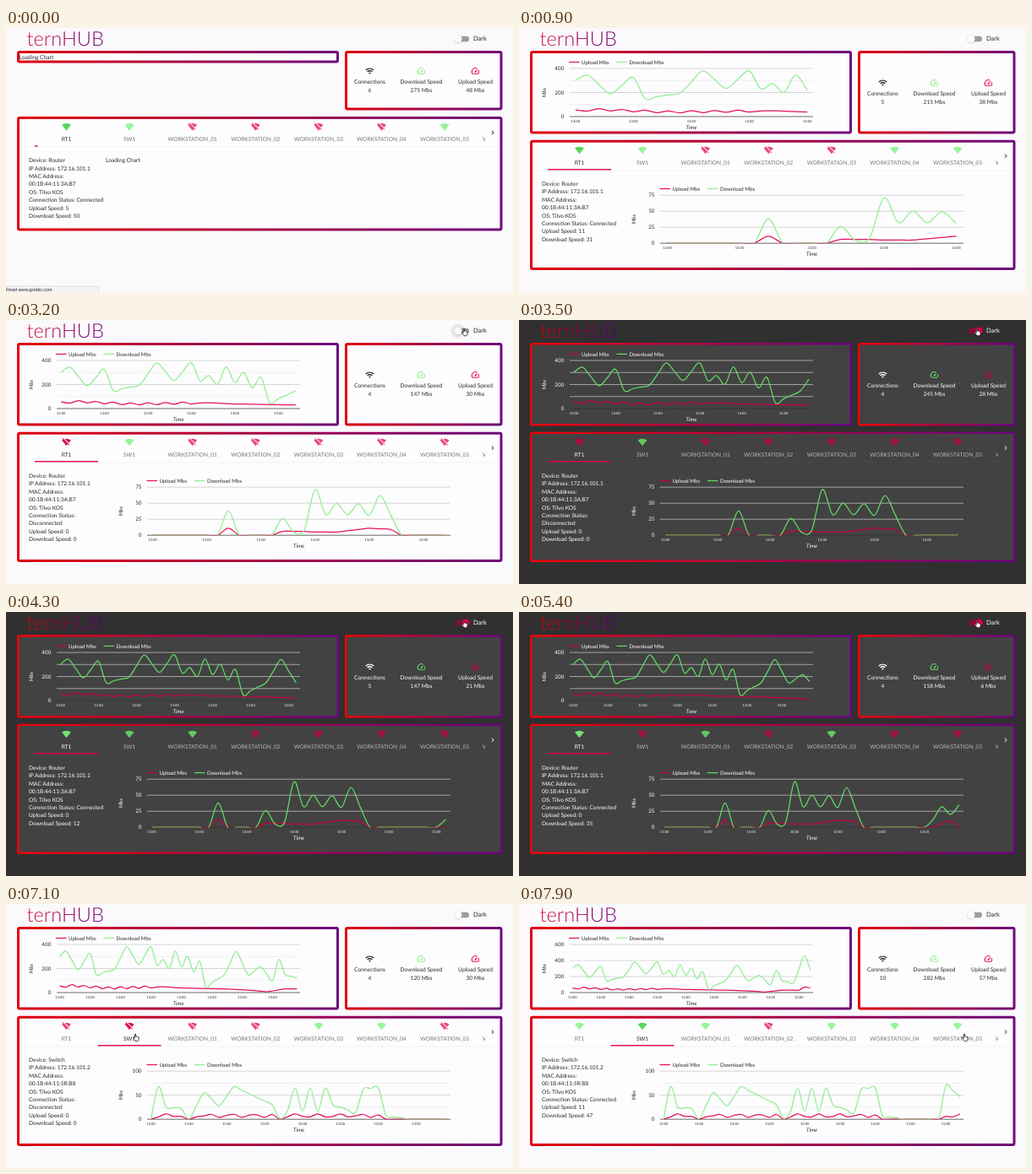
Write an HTML page that moves like this. It is 600 px wide and 313 px high and loops after 8000 ms.

```html
<!DOCTYPE html>
<html lang="en">
<head>
<meta charset="utf-8">
<title>Network dashboard</title>
<style>
  html, body { margin: 0; width: 100%; height: 100%; overflow: hidden; }
  svg { display: block; width: 600px; height: 313px; font-family: Lato, "Open Sans", sans-serif; text-rendering: geometricPrecision; }
</style>
</head>
<body>
<svg id="stage" viewBox="0 0 600 313"></svg>
<script>
const LOOP = 8000, STEP = 100;
const LOADED = 400, DARK_ON = 3400, DARK_OFF = 5800, TAB_SWITCH = 6600;
const POLL = 320, POLL_START = 750, SAMPLES = 44;

// Straight line between [position, value] keys, held at both ends
function track(keys, at) {
  const k = keys.findIndex(key => key[0] > at);
  if (k < 0) return keys[keys.length - 1][1];
  if (k === 0) return keys[0][1];
  const [[a, from], [b, to]] = [keys[k - 1], keys[k]];
  return from + (to - from) * (at - a) / (b - a);
}

// Samples along a track; within [first, last] odd ones swing up and even ones down
function series(keys, [first, last, size] = [0, -1, 0]) {
  return Array.from({ length: SAMPLES }, (_, i) => {
    const swing = i >= first && i <= last ? (i % 2 ? size : -size) : 0;
    return Math.round(track(keys, i) + swing);
  });
}

const total = {
  down: series([[0, 300], [1, 345], [3, 190], [5, 325], [6, 150], [9, 195], [11, 380], [13, 235], [15, 380],
    [16, 285], [17, 220], [19, 291], [23, 205], [24, 49], [27, 147], [29, 342], [31, 147], [33, 215], [35, 101],
    [36, 275], [37, 151], [39, 120], [41, 462], [42, 282]], [16, 23, 55]),
  up: series([[0, 48], [2, 58], [8, 38], [17, 48], [20, 38], [27, 30], [31, 21], [34, 6], [37, 30], [40, 30], [41, 68], [42, 57]], [0, 15, -8])
};
const router = {
  lines: ['Device: Router', 'IP Address: 172.16.101.1', 'MAC Address:', '00:1B:44:11:3A:B7'],
  down: series([[6, 0], [7, 38], [8, 0], [11, 0], [12, 26], [13, 5], [14, 8], [15, 71], [16, 41], [20, 40], [21, 62],
    [23, 0], [30, 0], [31, 12], [32, 32], [33, 20], [34, 35], [35, 0], [40, 0], [41, 40]], [16, 20, 9]),
  up: series([[6, 0], [7, 11], [8, 0], [11, 0], [12, 6], [17, 5], [20, 11], [22, 9], [23, 0], [31, 0], [33, 10], [34, 0]]),
  max: 75, step: 25
};
const netSwitch = {
  lines: ['Device: Switch', 'IP Address: 172.16.101.2', 'MAC Address:', '00:1B:44:11:5R:B8'],
  down: series([[0, 0], [1, 68], [2, 25], [4, 22], [5, 1], [7, 55], [9, 28], [11, 68], [16, 30], [17, 2], [18, 41], [23, 41],
    [24, 30], [27, 14], [28, 62], [30, 65], [31, 8], [34, 0], [39, 0], [40, 70], [42, 47]], [18, 23, 24]),
  max: 100, step: 50
};
netSwitch.up = netSwitch.down.map((v, i) => v > 8 ? Math.round(7.5 + 3.5 * Math.cos(2.2 * (i - 42))) : 0);

// Samples, connection count, workstation states
const links = [[18, 6, '00001'], [21, 5, '00011'], [28, 4, '00000'], [32, 5, '10000'],
  [35, 4, '10100'], [38, 4, '00110'], [43, 10, '10111']];

const POINTER_IN = 2700;
const pointerX = [[2700, 500], [3000, 542], [5900, 542], [6300, 153], [7300, 153], [7700, 527]];
const pointerY = [[2700, 90], [3000, 14], [5900, 14], [6300, 158]];

const light = {
  page: '#faf9fc', card: '#fdfcfe', ink: '#2b2b2b', dim: '#777', grid: '#ccc', minor: '#ececef', base: '#444',
  up: '#e3125c', down: '#90ee90', on: '#5bd65b', onDim: '#98f49a', off: '#d8144f', offDim: '#ec467f',
  left: '#e2000f', right: '#6f0a7a', title: ['#d3123a', '#74087c'], line: '#eeecf0', bar: '#e3125c', border: 3
};
const dark = {
  page: '#303030', card: '#424242', ink: '#fff', dim: '#b8b8b8', grid: '#bdbdbd', minor: '#bdbdbd', base: '#333',
  up: '#c2003f', down: '#62dc62', on: '#72e072', onDim: '#5fc95f', off: '#c2003f', offDim: '#b4083e',
  left: '#f00008', right: '#6c0082', title: ['#d4000c', '#50007a'], line: '#484848', bar: '#d80046', border: 2.4
};

const icons = {
  on: 'M12 21.5L23.64 7c-.45-.34-4.93-4-11.64-4S.81 6.66.36 7z',
  off: 'M23.64 7c-.45-.34-4.93-4-11.64-4-1.5 0-2.89.19-4.15.48L18.18 13.8zM17.04 15.22L3.27 1.44 2 2.72l2.05 2.06C1.91 5.76.59 6.82.36 7L12 21.5l3.91-4.87 3.32 3.32 1.27-1.27z',
  wifi: 'M1 9l2 2c4.97-4.97 13.03-4.97 18 0l2-2C16.93 2.93 7.08 2.93 1 9zm8 8l3 3 3-3c-1.65-1.66-4.34-1.66-6 0zm-4-4l2 2c2.76-2.76 7.24-2.76 10 0l2-2C15.14 9.14 8.87 9.14 5 13z',
  speed: 'M20.38 8.57l-1.23 1.85a8 8 0 0 1-.22 7.58H5.07A8 8 0 0 1 15.58 6.85l1.85-1.23A10 10 0 0 0 3.35 19a2 2 0 0 0 1.72 1h13.85a2 2 0 0 0 1.74-1 10 10 0 0 0-.27-10.44zm-9.79 6.84a2 2 0 0 0 2.83 0l5.66-8.49-8.49 5.66a2 2 0 0 0 0 2.83z',
  next: 'M8.59 16.59L13.17 12 8.59 7.41 10 6l6 6-6 6z',
  arrow: 'M0 0V15L3.6 11.6L6 17L8.4 16L6 10.8H11z',
  hand: 'M5 1.5c0-2 3-2 3 0V7c1-.8 2.6-.5 2.8.6 1-.6 2.4-.2 2.6.9 1.2-.4 2.4.2 2.4 1.6v4c0 3-2 5.4-5 5.4H9c-2 0-3-1-4-2.6L1 11.5c-1-1.6 1-3 2.3-1.6L5 11.6z'
};

const rect = (x, y, w, h, fill, extra = '') => `<rect x="${x}" y="${y}" width="${w}" height="${h}" fill="${fill}" ${extra}/>`;
const text = (x, y, s, size, fill, anchor = 'start', extra = '') =>
  `<text x="${x}" y="${y + size * 0.35}" font-size="${size}" fill="${fill}" text-anchor="${anchor}" ${extra}>${s}</text>`;
const icon = (name, cx, cy, fill, size = 11.3) =>
  `<path transform="translate(${cx - size / 2} ${cy - size / 2}) scale(${size / 24})" d="${icons[name]}" fill="${fill}"/>`;
const hLine = (x1, x2, y, color, w = 0.8) => `<path d="M${x1} ${y}H${x2}" stroke="${color}" stroke-width="${w}"/>`;

function card(x, y, w, h, c) {
  const b = c.border;
  return rect(x + b / 2, y + b / 2, w - b, h - b, c.card, `rx="1.5" stroke="url(#edge)" stroke-width="${b}"`);
}

function curve(values, count, px, py) {
  const at = i => {
    const k = Math.min(Math.max(i, 0), count - 1);
    return [px(k), py(values[k])];
  };
  let d = 'M' + at(0);
  for (let i = 0; i < count - 1; i++) {
    const [a, b, e, f] = [at(i - 1), at(i), at(i + 1), at(i + 2)];
    d += `C${b[0] + (e[0] - a[0]) / 6} ${b[1] + (e[1] - a[1]) / 6} ${e[0] - (f[0] - b[0]) / 6} ${e[1] - (f[1] - b[1]) / 6} ${e}`;
  }
  return d;
}

function chart(id, data, n, max, step, box, c) {
  const { x, top, w, legend, axisX, nameX } = box, h = 57, base = top + h;
  const px = i => x + (i + 0.5) * w / n, py = v => base - v / max * h;
  let s = `<clipPath id="${id}"><rect x="${x}" y="${top - 6}" width="${w}" height="${h + 6.4}"/></clipPath>`;
  if (max / step === 2) {
    for (const v of [0.5, 1.5]) s += hLine(x, x + w, py(v * step), c.minor);
  }
  for (let v = 0; v <= max; v += step) {
    s += hLine(x, x + w, py(v), v ? c.grid : c.base);
    s += text(axisX, py(v), v, 6.3, c.ink, 'end');
  }
  for (const key of ['up', 'down']) {
    s += `<path clip-path="url(#${id})" d="${curve(data[key], n, px, py)}" fill="none" stroke="${c[key]}" stroke-width="1.25"/>`;
  }
  for (let i = 0; i < n; i += 5) s += text(px(i), base + 5.2, '13:00', 4.1, c.ink, 'middle');
  ['up', 'down'].forEach((key, i) => {
    const lx = legend + i * 56.5, name = ['Upload Mbs', 'Download Mbs'][i];
    s += hLine(lx, lx + 12.5, top - 7.6, c[key], 1.2) + text(lx + 15, top - 7.6, name, 6.15, c.ink);
  });
  s += text(x + w / 2, base + 12.8, 'Time', 6.3, c.ink, 'middle', 'font-style="italic"');
  const ny = top + h / 2;
  return s + text(nameX, ny, 'Mbs', 6.3, c.ink, 'middle', `font-style="italic" transform="rotate(-90 ${nameX} ${ny})"`);
}

function toggle(isDark, hover, c) {
  const x = isDark ? 544 : 535;
  return (hover ? `<circle cx="${x}" cy="13" r="8.5" fill="${isDark ? c.up : '#000'}" opacity=".07"/>` : '')
    + rect(532, 9.8, 16, 6.4, isDark ? '#860c3a' : '#9b9b9d', 'rx="3.2"')
    + `<circle cx="${x}" cy="13.5" r="4.9" fill="#000" opacity=".18"/>`
    + `<circle cx="${x}" cy="13" r="4.6" fill="${isDark ? '#e00049' : '#fcfcfc'}"/>`
    + text(553, 12.7, 'Dark', 7.5, c.ink);
}

function stats(dy, n, conn, c) {
  const items = [
    [430.5, 'wifi', c.ink, 'Connections', conn],
    [491.5, 'speed', c.down, 'Download Speed', total.down[n - 1] + ' Mbs'],
    [555.5, 'speed', c.up, 'Upload Speed', total.up[n - 1] + ' Mbs']
  ];
  return items.map(([x, name, fill, label, value]) => icon(name, x, 65 + dy, fill)
    + text(x, 78 + dy, label, 6.7, c.ink, 'middle') + text(x, 88 + dy, value, 6.6, c.ink, 'middle')).join('');
}

function tabs(y, active, states, barWidth, c) {
  const gap = 74.6;
  let s = hLine(16, 584.5, y + 36.2, c.line, 0.7);
  states.forEach((isOn, i) => {
    const name = ['RT1', 'SW1'][i] || 'WORKSTATION_0' + (i - 1);
    const x = 71.5 + i * gap, kind = isOn ? 'on' : 'off', chosen = i === active;
    s += icon(kind, x, y + 12.2, c[chosen ? kind : kind + 'Dim']);
    s += text(x, y + 27, name, 6.6, chosen ? c.ink : c.dim, 'middle');
  });
  s += `<clipPath id="more"><rect x="560" y="${y}" width="7" height="36"/></clipPath>`;
  s += text(564, y + 27, 'WORKSTATION_06', 6.6, c.dim, 'start', 'clip-path="url(#more)"');
  s += rect(34 + active * gap, y + 34.3, barWidth, 1.5, c.bar);
  return s + icon('next', 576, y + 19, c.ink, 9.6);
}

function details(y, device, n, isOn, c) {
  const lines = [...device.lines, 'OS: Tilvo KOS',
    ...(isOn ? ['Connection Status: Connected'] : ['Connection Status:', 'Disconnected']),
    'Upload Speed: ' + device.up[n - 1], 'Download Speed: ' + device.down[n - 1]];
  return lines.map((line, i) => text(27, y + 52 + i * 9.38, line, 6.6, c.ink)).join('');
}

function drawPointer(x, y) {
  const isHand = y < 22 || y > 135;
  const [name, dx, dy] = isHand ? ['hand', 3, 4] : ['arrow', 0, 0];
  return `<path transform="translate(${x - dx} ${y - dy}) scale(.45)" d="${icons[name]}" fill="#fff" stroke="#111" stroke-width="1.8"/>`;
}

function render(t) {
  const isDark = t >= DARK_ON && t < DARK_OFF, c = isDark ? dark : light;
  const loaded = t >= LOADED, n = 21 + Math.floor((t - POLL_START) / POLL);
  const [, conn, bits] = links.reduce((a, b) => Math.abs(b[0] - n) < Math.abs(a[0] - n) ? b : a);
  const states = [router.down[n - 1] > 0, netSwitch.down[n - 1] > 0, ...[...bits].map(Number)];
  const active = t >= TAB_SWITCH ? 1 : 0, device = [router, netSwitch][active];
  const y = loaded ? 132.7 : 105;
  const hasPointer = t >= POINTER_IN, mx = track(pointerX, t), my = track(pointerY, t);
  const stops = (a, b) => `<stop stop-color="${a}"/><stop offset="1" stop-color="${b}"/>`;

  let s = `<defs><linearGradient id="edge">${stops(c.left, c.right)}</linearGradient>
    <linearGradient id="name">${stops(...c.title)}</linearGradient></defs>`;
  s += rect(0, 0, 600, 313, c.page);
  s += `<text x="24.5" y="20.6" font-size="23.6" font-weight="300" fill="url(#name)">ternHUB</text>`;
  s += toggle(isDark, hasPointer && my < 22, c);
  s += card(13, 27, 381, loaded ? 98.5 : 14.5, c);
  s += card(401, 27, 186.5, loaded ? 98.5 : 70.5, c);
  s += card(13, y, 574.5, loaded ? 154.3 : 135.5, c);
  s += stats(loaded ? 0 : -14, n, conn, c);
  s += tabs(y, active, states, t < STEP ? 3.5 : 75, c);
  s += details(y, device, n, states[active], c);
  if (loaded) {
    const max = Math.max(...total.down.slice(0, n)) > 400 ? 600 : 400;
    s += chart('all', total, n, max, 200, { x: 60, top: 48, w: 288, legend: 59, axisX: 53.3, nameX: 30 }, c);
    s += chart('one', device, n, device.max, device.step, { x: 167, top: 198.2, w: 359, legend: 166.5, axisX: 160.5, nameX: 135.7 }, c);
  } else {
    s += text(15.5, 34.5, 'Loading Chart', 6.7, c.ink) + text(118, 157, 'Loading Chart', 6.7, c.ink);
    s += rect(-1, 306, 111, 8, '#f3f2f4', 'stroke="#d4d3d6" stroke-width=".6"');
    s += text(0, 310, 'Read www.gstatic.com', 5.4, '#222', 'start', 'font-family="Liberation Sans, sans-serif"');
  }
  return s + (hasPointer ? drawPointer(mx, my) : '');
}

const stage = document.getElementById('stage');
const start = performance.now();
let shown = -1;
function tick() {
  const t = Math.floor((performance.now() - start) % LOOP / STEP) * STEP;
  if (t !== shown) stage.innerHTML = render(shown = t);
  requestAnimationFrame(tick);
}
tick();
</script>
</body>
</html>
```
